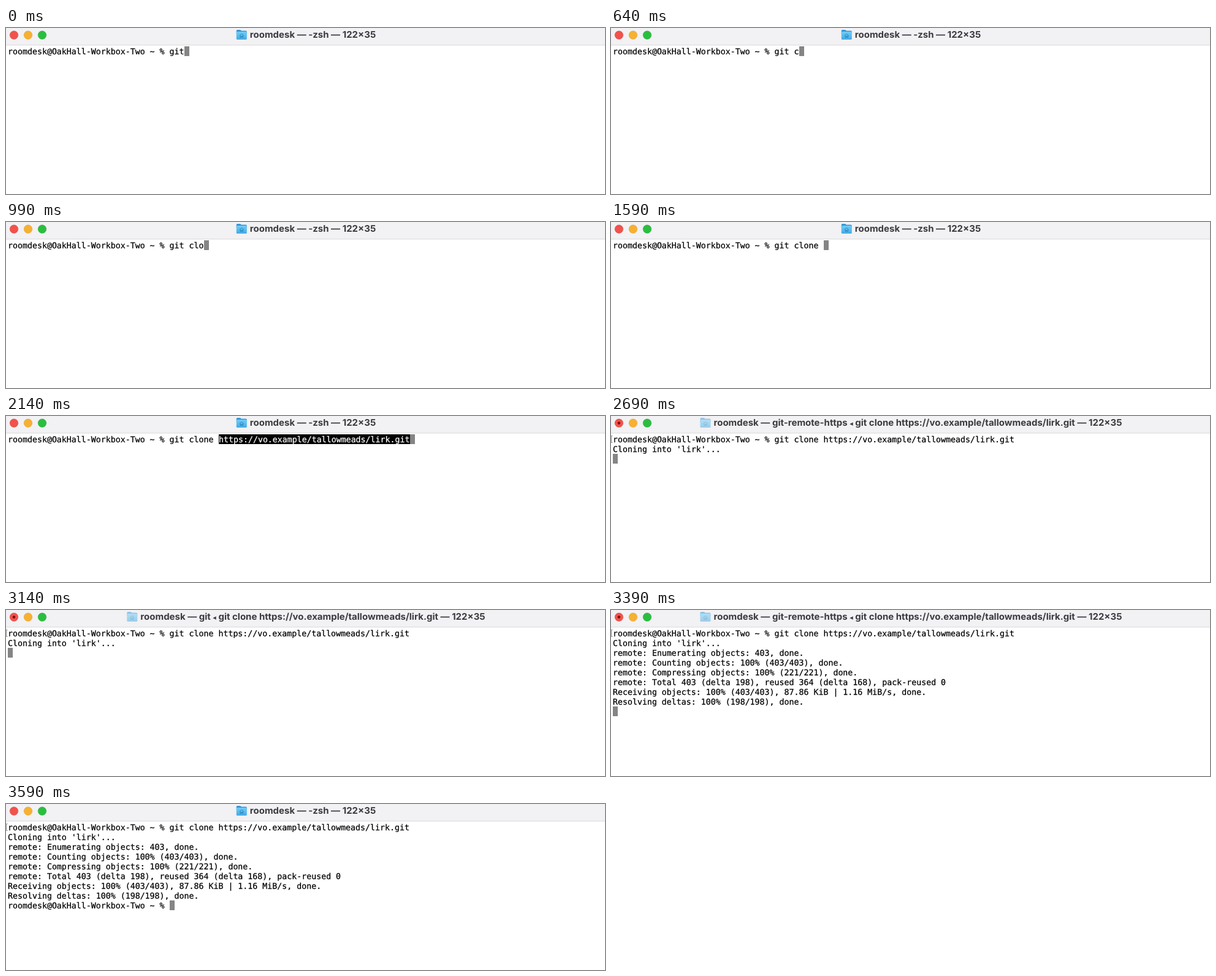
These frames come from a looping animation (977x272 px, 3740 ms). An HTML page:

```html
<!DOCTYPE html>
<html lang="en">
<head>
<meta charset="utf-8">
<title>Terminal</title>
<style>
  html, body { margin: 0; width: 100%; height: 100%; overflow: hidden; background: #fff; }
  svg { display: block; width: 977px; height: 272px; }
  text { white-space: pre; text-rendering: geometricPrecision; }
  #title { font: 700 15px Inter, "DejaVu Sans", sans-serif; fill: #3c3b3f; }
  .mono { font: 13.288px "DejaVu Sans Mono", monospace; fill: #000; stroke: #000; stroke-width: .25; }
  #pasted { fill: #fff; stroke: #fff; }
</style>
</head>
<body>
<svg viewBox="0 0 977 272">
  <defs>
    <linearGradient id="blue" x2="0" y2="1">
      <stop stop-color="#6fcdf8"/>
      <stop offset="1" stop-color="#43a9e3"/>
    </linearGradient>
  </defs>
  <rect width="977" height="272" fill="#fff"/>
  <rect width="977" height="27.5" fill="#f2f1f4"/>
  <rect y="27.5" width="977" height="1" fill="#d6d5d8"/>
  <g stroke-opacity=".6" stroke-width=".8">
    <circle cx="13" cy="11.6" r="6.8" fill="#f1524b" stroke="#d9453f"/>
    <circle cx="36" cy="11.6" r="6.8" fill="#f6b132" stroke="#dd9c2b"/>
    <circle cx="59" cy="11.6" r="6.8" fill="#2abe3f" stroke="#25a636"/>
  </g>
  <circle id="busy" cx="13" cy="11.6" r="2.3" fill="#7c0f0c"/>
  <g id="heading">
    <g id="folder">
      <path d="M0 4.5q0-1.5 1.5-1.5h4.2q.8 0 1.4.6l.9.9h7.500q1.500 0 1.500 1.500v4H0z" fill="#3597d3"/>
      <rect y="6" width="17" height="13" rx="1.5" fill="url(#blue)"/>
      <path d="M5.200 12.400 8.500 9.400 11.800 12.400M6.300 12v3.500h1.500v-2h1.400v2h1.500V12" fill="none" stroke="#2b86c2" stroke-width="1"/>
    </g>
    <text id="title" x="22" y="16.300"></text>
  </g>
  <path id="mark" d="M2.500 32.500H.5V43.500H2.500" fill="none" stroke="#8a8a8a"/>
  <g id="rows"></g>
  <rect id="cursor" width="8" height="16" fill="#858585"/>
  <g id="paste">
    <rect id="block" y="30" height="16" fill="#000"/>
    <text id="pasted" class="mono"></text>
  </g>
</svg>
<script>
const LOOP = 3740, LEFT = 3, TOP = 30, COL = 8, ROW = 16, BASE = 12.9, CENTER = 489.5;
const USER = "roomdesk", REPO = "lirk";
const URL_TEXT = `https://vo.example/tallowmeads/${REPO}.git`;
const PROMPT = `${USER}@OakHall-Workbox-Two ~ % `;
const COMMAND = "git clone ";
const $ = id => document.getElementById(id);

// Cues are [start ms, value]; the last one reached applies.
const typed = [[0, 3], [290, 4], [640, 5], [790, 6], [940, 7], [1240, 8], [1390, 9], [1590, 10]];
const PASTE = 1940, ENTER = 2540;
const job = [[0, ""], [2590, "git"], [2640, "git-remote-https"], [2940, "git"],
             [3240, "git-remote-https"], [3490, ""]];
const output = [
  [2590, `Cloning into '${REPO}'...`],
  [3240, "remote: Enumerating objects: 403, done."],
  [3240, "remote: Counting objects: 100% (403/403), done."],
  [3290, "remote: Compressing objects: 100% (221/221), done."],
  [3340, "remote: Total 403 (delta 198), reused 364 (delta 168), pack-reused 0"],
  [3340, "Receiving objects: 100% (403/403), 87.86 KiB | 1.16 MiB/s, done."],
  [3390, "Resolving deltas: 100% (198/198), done."],
  [3440, PROMPT]
];

const at = (cues, t) => cues.filter(c => c[0] <= t).pop()[1];
const show = (el, on) => el.setAttribute("visibility", on ? "visible" : "hidden");

function setText(el, s) {
  if (el.textContent !== s) el.textContent = s;
}

const rows = Array.from({ length: output.length + 1 }, (_, i) => {
  const el = document.createElementNS("http://www.w3.org/2000/svg", "text");
  el.setAttribute("class", "mono");
  el.setAttribute("x", LEFT);
  el.setAttribute("y", TOP + BASE + i * ROW);
  return $("rows").appendChild(el);
});

const pasteX = LEFT + COL * (PROMPT + COMMAND).length;
$("block").setAttribute("x", pasteX);
$("block").setAttribute("width", COL * URL_TEXT.length);
$("pasted").setAttribute("x", pasteX);
$("pasted").setAttribute("y", TOP + BASE);
$("pasted").textContent = URL_TEXT;

function drawTitle(name) {
  const task = name ? `${name} ◂ ${COMMAND}${URL_TEXT}` : "-zsh";
  const title = $("title"), label = `${USER} — ${task} — 122×35`;
  if (title.textContent !== label) {
    title.innerHTML = label.replace("◂", '<tspan font-size="11">◂</tspan>');
  }
  const x = CENTER - (22 + title.getComputedTextLength()) / 2;
  $("heading").setAttribute("transform", `translate(${x})`);
  $("folder").setAttribute("opacity", name ? 0.5 : 1);
  show($("busy"), name);
}

function draw(t) {
  const entered = t >= ENTER;
  const selected = t >= PASTE && !entered;
  const command = PROMPT + COMMAND.slice(0, at(typed, t)) + (entered ? URL_TEXT : "");
  const lines = [command, ...output.filter(o => o[0] <= t).map(o => o[1])];
  rows.forEach((el, i) => setText(el, lines[i] || ""));

  let row = 0, col = command.length + (selected ? URL_TEXT.length : 0);
  if (entered) {
    const ready = lines[lines.length - 1] === PROMPT;
    row = lines.length - (ready ? 1 : 0);
    col = ready ? PROMPT.length : 0;
  }
  $("cursor").setAttribute("x", LEFT + col * COL);
  $("cursor").setAttribute("y", TOP + row * ROW);

  show($("paste"), selected);
  show($("mark"), entered);
  drawTitle(at(job, t));
}

const start = performance.now();
function tick() {
  draw((performance.now() - start) % LOOP);
  requestAnimationFrame(tick);
}
tick();
</script>
</body>
</html>
```
